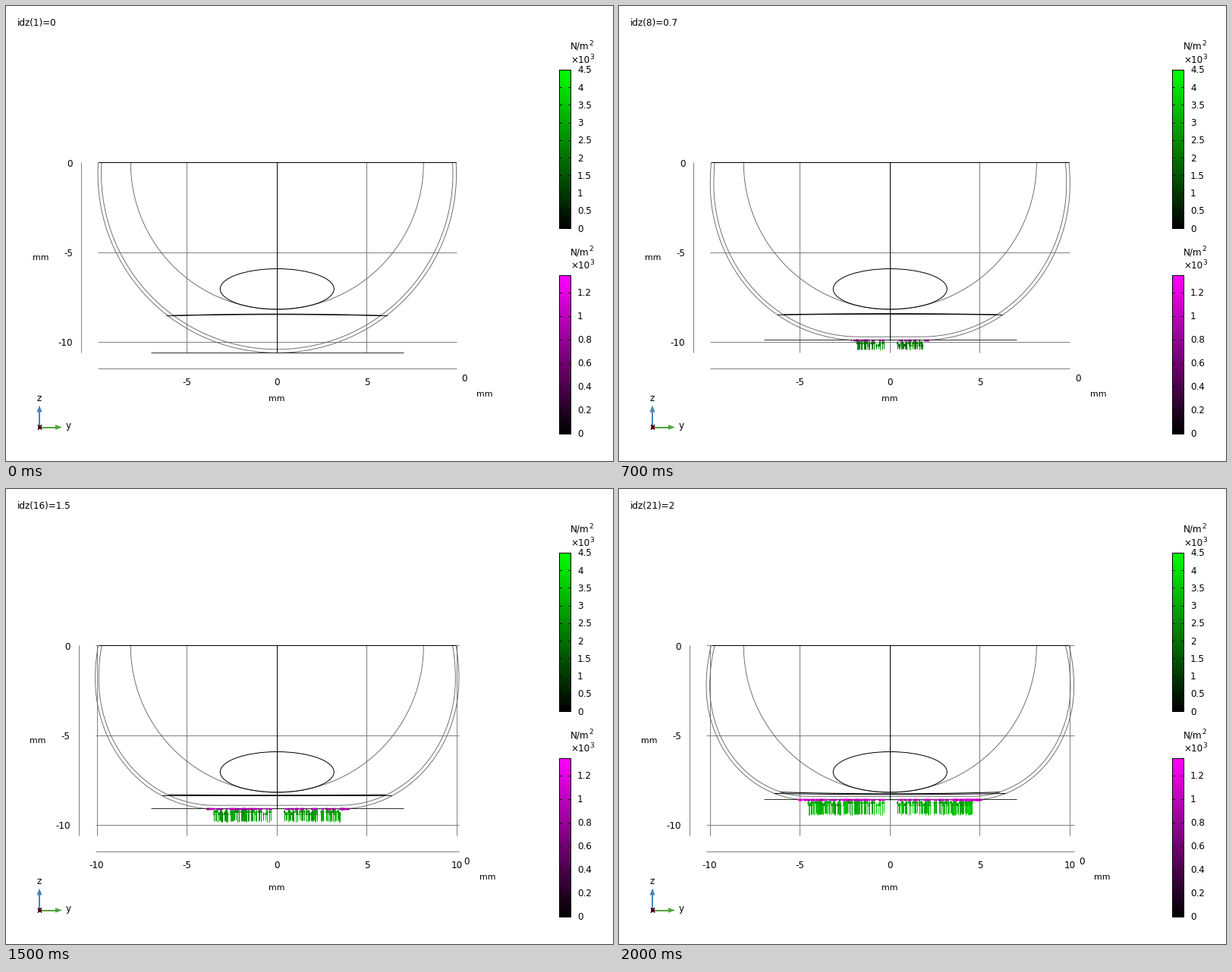
Recreate the animation shown at these times as a matplotlib script. Size 800 by 600 pixels, loop 2.1 s.

```python
import numpy as np
import matplotlib.pyplot as plt
from matplotlib.animation import FuncAnimation
from matplotlib.collections import LineCollection, PolyCollection
from matplotlib.patches import Ellipse, Polygon, Rectangle

FRAMES = 21
PX = 0.72                       # one pixel in points
CX, MM = 357.3, 23.72           # stage centre and pixels per millimetre
TOP, FLOOR = 206, 457.35
CY = 221                        # centre of the undeformed shells
GREY, DARK = "#808080", "#5c5c5c"

fig = plt.figure(figsize=(8, 6), dpi=100, facecolor="white")
ax = fig.add_axes([0, 0, 1, 1])
ax.axis("off")


def line(x, y, color="black", w=1.0, z=2):
    return ax.plot(x, y, color=color, lw=w * PX, zorder=z,
                   solid_capstyle="butt")[0]


def label(x, y, s, ha="center", size=12):
    return ax.text(x, y, s, ha=ha, va="baseline", fontsize=size * PX,
                   family="DejaVu Sans", zorder=6)


def grid_x(mm):
    return CX + mm * MM - 0.5


def color_bar(y0, y1, top, vmax, ticks):
    ramp = np.linspace(1, 0, 209)[:, None, None] * np.array(top)
    ax.imshow(ramp, extent=(729, 744, y1, y0), aspect="auto", zorder=2)
    ax.add_patch(Rectangle((729, y0), 15, y1 - y0, fill=False,
                           lw=PX, ec="black", zorder=4))
    for v in ticks:
        y = y1 - (y1 - y0) * v / vmax
        line([729, 732], [y, y], z=4)
        line([741, 744], [y, y], z=4)
        label(753, y + 4.5, f"{v:g}", "left")
    label(744, y0 - 27, "N/m", "left")
    label(768.3, y0 - 32, "2", "left", 9)
    label(744, y0 - 9, "×10", "left")
    label(769, y0 - 14, "3", "left", 9)


def triad(x, y):
    blue, green = "#4a84bd", "#4fa53c"
    line([x, x], [y, y - 22], blue, 2)
    line([x, x + 22], [y, y], green, 2)
    ax.add_patch(Polygon([(x, y - 29), (x - 3.5, y - 20), (x + 3.5, y - 20)],
                         fc=blue, lw=0, zorder=3))
    ax.add_patch(Polygon([(x + 30, y), (x + 21, y - 3.3), (x + 21, y + 3.3)],
                         fc=green, lw=0, zorder=3))
    ax.add_patch(Rectangle((x - 2.5, y - 2.5), 5, 5, fc="#b5123f", lw=0,
                           zorder=3))
    label(x, y - 34.5, "z")
    label(x + 38.5, y + 2, "y")
    label(x, y + 3.5, "x")


def shell(r, floor, d):
    """Bowl of radius r on the floor: flat base, elliptic sides, bent rim."""
    wide = r + 1.5 * d * d
    waist = CY + 19.5 * d
    flat = 108 * (d / 2) ** 0.9
    rim = np.sqrt(r * r - (CY - TOP) ** 2)

    u = np.linspace(1, 0, 40, endpoint=False)
    t = np.linspace(0, np.pi / 2, 120)
    x = np.concatenate([wide - (wide - rim) * u * u,
                        flat + (wide - flat) * np.cos(t)])
    y = np.concatenate([waist - (waist - TOP - 0.5) * u,
                        waist + (floor - waist) * np.sin(t)])
    return (CX + np.concatenate([-x, x[::-1]]),
            np.concatenate([y, y[::-1]]))


def bow(half, y_end, y_mid):
    u = np.linspace(-1, 1, 61)
    return CX + half * u, y_mid + (y_end - y_mid) * u * u


# fixed parts
for gx in (-5, 0, 5):
    line([grid_x(gx)] * 2, [TOP, FLOOR], GREY, z=1)
    label(grid_x(gx), 500, f"{gx}")
arc = np.linspace(-np.pi / 2, np.pi / 2, 181)
line(CX + 193 * np.sin(arc), 207 + 193 * np.cos(arc), DARK, 0.85)
ax.add_patch(Ellipse((CX, 373.2), 150, 53.4, fill=False, lw=PX, ec="black",
                     zorder=3))
line([121.5, 593.2], [TOP, TOP], z=3)
color_bar(84, 293, (0, 1, 0), 4.5, np.arange(10) / 2)
color_bar(355, 564, (1, 0, 1), 1.345, np.arange(7) / 5)
triad(44, 555.5)

# moving parts
title = label(15, 26, "", "left")
row_y = (TOP, 325, 443, 478)
rows = [line([], [], GREY, z=1) for _ in row_y]
sides = [line([grid_x(s)] * 2, [TOP, FLOOR], GREY, z=1) for s in (-10, 10)]
side_labels = [label(grid_x(s), 500, f"{s}") for s in (-10, 10)]
z_axis = line([], [], GREY, z=1)
z_labels = [label(0, y + 5.5, s, "right")
            for y, s in zip(row_y, ("0", "-5", "-10"))]
z_unit = label(0, 335, "mm", size=11)
y_unit = label(CX - 0.5, 521, "mm", size=11)
x_zero = label(0, 495, "0")
x_unit = label(0, 515, "mm", size=11)
outer, inner = line([], [], DARK, 0.85), line([], [], DARK, 0.85)
ring_out, ring_in = line([], [], z=3), line([], [], z=3)
plate, stem = line([], [], "#303030"), line([], [], z=3)
shafts = LineCollection([], linewidths=PX, zorder=4)
heads = PolyCollection([], linewidths=0, zorder=4)
shear = LineCollection([], linewidths=2.4 * PX, zorder=5)
for c in (shafts, heads, shear):
    ax.add_collection(c, autolim=False)
ax.set(xlim=(0, 800), ylim=(600, 0))

# contact arrows sit at fixed spots, denser towards the edge
rng = np.random.default_rng(7)
N = 300
spot = rng.choice([-1, 1], N) * 124 * rng.random(N) ** 0.65
reach = rng.uniform(0.84, 1.03, N)
tint = rng.uniform(0.75, 1.15, N)
drop = rng.choice([1, 1, 4], N)


def draw_arrows(d, floor):
    on = (np.abs(spot) < 9 + 49.5 * d) & (d > 0)
    x, top = CX + spot[on], floor + drop[on]
    tip = floor + (8.5 + 5.5 * d) * reach[on]
    green = np.clip((0.42 + 0.18 * d) * tint[on], 0, 1)
    colors = np.stack([0 * green, green, 0 * green], axis=1)
    shafts.set_segments([[(a, b), (a, c)] for a, b, c in zip(x, top, tip)])
    shafts.set_color(colors)
    heads.set_verts([[(a, b), (a - 1.5, b + 4), (a + 1.5, b + 4)]
                     for a, b in zip(x, top)])
    heads.set_facecolor(colors * 0.9)

    mark, shade = spot[::2], tint[::2]
    on = (np.abs(mark) < 13 + 54.5 * d) & (d > 0)
    x, size = CX + mark[on], (0.8 + 0.5 * d) * shade[on]
    pink = np.clip((0.32 + 0.25 * d) * shade[on], 0, 1)
    shear.set_segments([[(a - s, floor), (a + s, floor)]
                        for a, s in zip(x, size)])
    shear.set_color(np.stack([pink, 0 * pink, pink], axis=1))


def update(i):
    d = i / 10
    floor = FLOOR - MM * d
    title.set_text(f"idz({i + 1})={d:g}")

    x, y = shell(236.3, floor, d)
    outer.set_data(x, y)
    left, right = x.min(), x.max()
    inner.set_data(*shell(231.7, floor - 4.6, d))
    ring_out.set_data(*bow(145.8 + 3.5 * d, 408.5 - 0.7 * d - 1.4 * d * d,
                           406.8 - d * d))
    ring_in.set_data(*bow(137.8 + 3.5 * d, 408.3 - 0.8 * d - 1.75 * d * d,
                          406.2 - 1.1 * d * d))
    plate.set_data([191, 523.5], [floor - 0.5] * 2)
    stem.set_data([grid_x(0)] * 2, [TOP, floor])
    draw_arrows(d, floor)

    for row, ry in zip(rows, row_y):
        row.set_data([left, right], [ry, ry])
    z_axis.set_data([left - 22] * 2, [TOP, FLOOR])
    for t in z_labels:
        t.set_x(left - 33)
    z_unit.set_x(left - 75.7)
    x_zero.set_x(right + 10.5)
    x_unit.set_x(right + 37.3)

    wide = d > 0.85
    for part in sides + side_labels:
        part.set_visible(wide)
    y_unit.set_y(529 if wide else 521)
    return []


anim = FuncAnimation(fig, update, frames=FRAMES, interval=100,
                     init_func=lambda: update(0), repeat=True,
                     repeat_delay=0, blit=False)
plt.show()
```
